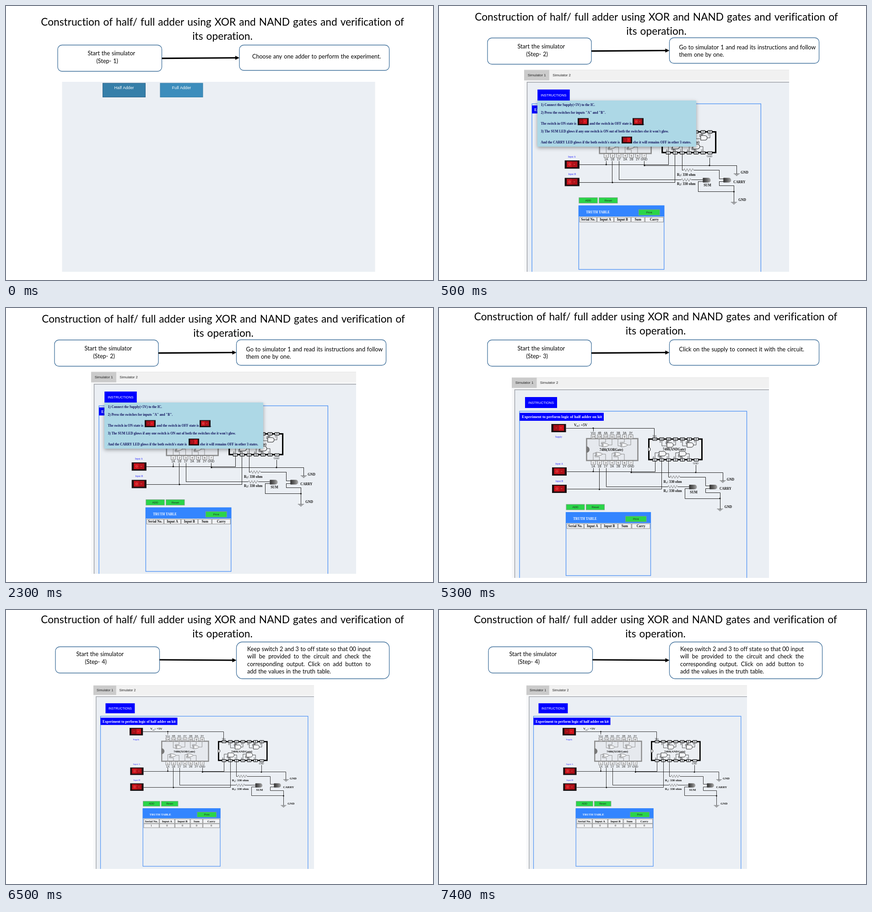
An HTML page with a canvas that plays this animation: 933 px wide and 600 px high, repeating every 8 s.

```html
<!DOCTYPE html>
<html lang="en">
<head>
<meta charset="utf-8">
<title>Half adder steps</title>
<style>
  html, body { margin: 0; width: 100%; height: 100%; overflow: hidden; background: #fff; }
  canvas { display: block; }
</style>
</head>
<body>
<canvas id="stage" width="933" height="600"></canvas>
<script>
const ctx = document.getElementById('stage').getContext('2d');
const SANS = '"Liberation Sans", sans-serif';
const SERIF = '"Liberation Serif", serif';
const LATO = 'Lato, sans-serif';
const PANEL = '#ebeff4';
const LOOP = 8000;
const TITLE_SIZE = 22.7;
const BODY_SIZE = 12.6;
const WORD_GAP = 0.054;

const TITLE = [
  'Construction of half/ full adder using XOR and NAND gates and verification of',
  'its operation.'
];

// left/right: [x, y, width, height] of the two boxes; sim: [x, y, scale, right, bottom]
const scenes = [
  { until: 500, title: [473, 43], left: [113, 85.5, 227.5, 57.5], right: [510, 85.5, 327.5, 55.5],
    step: [178.5, 108], note: [538, 115], arrow: [114.7, 113.5],
    lines: ['Choose any one adder to perform the experiment.'] },
  { until: 3500, title: [475, 32], left: [106, 70, 227, 57.5], right: [503.5, 69.5, 327, 56],
    step: [171.5, 92.5], note: [524.5, 94.5], arrow: [98.7, 97.5],
    lines: ['Go to simulator 1 and read its instructions and follow', 'them one by one.'],
    sim: [186, 139.6, 1.0075, 765, 582], help: true },
  { until: 6500, title: [473.5, 27], left: [106, 70, 227, 57.5], right: [503.5, 69.5, 327, 56],
    step: [171.5, 92.5], note: [524.5, 94.5], arrow: [98.7, 97.5],
    lines: ['Click on the supply to connect it with the circuit.'],
    sim: [159, 152, 1, 721, 591] },
  { until: LOOP, title: [473, 29], left: [108, 80.5, 227.5, 57.5], right: [503.5, 70, 334, 80.5],
    step: [153.5, 101], note: [527, 89.5], arrow: [109, 110], justify: 270,
    lines: ['Keep switch 2 and 3 to off state so that 00 input',
            'will be provided to the circuit and check the',
            'corresponding output. Click on add button to',
            'add the values in the truth table.'],
    sim: [191, 165, 0.913, 673, 567], row: true }
];

function text(str, x, y, size, { font = SERIF, weight = 'bold', color = '#111', align = 'left', gap = 0 } = {}) {
  ctx.font = `${weight} ${size}px ${font}`;
  ctx.fillStyle = color;
  ctx.textAlign = align;
  ctx.wordSpacing = gap + 'px';
  ctx.letterSpacing = '0.001px'; // any spacing turns ligatures off
  ctx.fillText(str, x, y);
  ctx.wordSpacing = '0px';
}

// Text centred on a point
const label = (str, x, y, size, opts = {}) =>
  text(str, x, y + size * 0.34, size, { align: 'center', ...opts });

const sans = (str, x, y, size, color = '#222') =>
  label(str, x, y, size, { font: SANS, weight: 'normal', color });

const lato = (str, x, y, size, opts = {}) =>
  text(str, x, y, size, { font: LATO, weight: 'normal', color: '#000', gap: size * WORD_GAP, ...opts });

function box(x, y, w, h, fill, stroke, width = 1) {
  if (fill) { ctx.fillStyle = fill; ctx.fillRect(x, y, w, h); }
  if (stroke) { ctx.strokeStyle = stroke; ctx.lineWidth = width; ctx.strokeRect(x, y, w, h); }
}

function line(points, color = '#222', width = 1) {
  ctx.beginPath();
  for (let i = 0; i < points.length; i += 2) ctx.lineTo(points[i], points[i + 1]);
  ctx.strokeStyle = color;
  ctx.lineWidth = width;
  ctx.stroke();
}

// A line whose corners sit on pixel centres of the stage
function wire(points, color, width) {
  const { a, e, f } = ctx.getTransform();
  const snap = (v, shift) => (Math.floor(v * a + shift) + 0.5 - shift) / a;
  line(points.map((v, i) => snap(v, i % 2 ? f : e)), color, width);
}

function dot(x, y, r = 1.6, fill = '#111') {
  ctx.beginPath();
  ctx.arc(x, y, r, 0, 7);
  ctx.fillStyle = fill;
  ctx.fill();
}

function rounded([x, y, w, h], radius) {
  ctx.beginPath();
  ctx.roundRect(x, y, w, h, radius);
  ctx.strokeStyle = '#41719c';
  ctx.lineWidth = 1.3;
  ctx.stroke();
}

function drawSlide(scene, number) {
  const [tx, ty] = scene.title;
  TITLE.forEach((str, i) => lato(str, tx, ty + i * 31, TITLE_SIZE, { align: 'center' }));

  rounded(scene.left, 9.5);
  rounded(scene.right, scene.right[3] > 60 ? 13 : 9.5);
  const start = scene.left[0] + scene.left[2], tip = scene.right[0];
  const [y0, y1] = scene.arrow;
  line([start, y0, tip - 7, y1], '#000', 3.2);
  ctx.beginPath();
  ctx.moveTo(tip, y1);
  ctx.lineTo(tip - 9, y1 - 4.6);
  ctx.lineTo(tip - 9, y1 + 4.6);
  ctx.fillStyle = '#000';
  ctx.fill();

  const [sx, sy] = scene.step;
  lato('Start the simulator', sx, sy, BODY_SIZE);
  lato(`(Step- ${number})`, sx + 19, sy + 17, BODY_SIZE);

  const [nx, ny] = scene.note;
  scene.lines.forEach((str, i) => {
    let gap = BODY_SIZE * WORD_GAP;
    if (scene.justify && i < scene.lines.length - 1) {
      ctx.font = `${BODY_SIZE}px ${LATO}`;
      gap = (scene.justify - ctx.measureText(str).width) / (str.split(' ').length - 1);
    }
    lato(str, nx, ny + i * 16.6, BODY_SIZE, { gap });
  });
}

function drawMenu() {
  box(122.5, 166, 684, 416, PANEL);
  box(211.5, 169, 93, 30.5, '#367fa9', '#2a6188');
  box(337, 169, 93, 30.5, '#3c8dbc', '#367fa9');
  sans('Half Adder', 258, 179, 9.1, '#fff');
  sans('Full Adder', 383.5, 179, 9.1, '#fff');
}

function rocker(x, y, w = 32, h = 18, off = true) {
  box(x, y, w, h, '#1c1012');
  const ix = x + w * 0.14, iy = y + h * 0.12, iw = w * 0.72, ih = h * 0.7;
  box(ix, iy, iw / 2, ih, off ? '#cc141c' : '#a40e16');
  box(ix + iw / 2, iy, iw / 2, ih, off ? '#b01018' : '#d4141c');
  const my = y + h * 0.48;
  if (off) {
    ctx.beginPath();
    ctx.arc(ix + iw * 0.27, my, h * 0.11, 0, 7);
    ctx.strokeStyle = '#e07870';
    ctx.lineWidth = 0.8;
    ctx.stroke();
  } else {
    line([ix + iw * 0.2, my, ix + iw * 0.34, my], '#c85850', 0.8);
  }
  line([ix + iw * 0.64, my, ix + iw * 0.78, my], '#e07870', 0.8);
}

function gate(x, y, w, h, xor, color) {
  ctx.beginPath();
  if (xor) {
    ctx.moveTo(x, y - h / 2);
    ctx.quadraticCurveTo(x + w * 0.75, y - h / 2, x + w, y);
    ctx.quadraticCurveTo(x + w * 0.75, y + h / 2, x, y + h / 2);
    ctx.quadraticCurveTo(x + w * 0.28, y, x, y - h / 2);
  } else {
    ctx.moveTo(x, y - h / 2);
    ctx.lineTo(x + w - h / 2, y - h / 2);
    ctx.arc(x + w - h / 2, y, h / 2, -Math.PI / 2, Math.PI / 2);
    ctx.lineTo(x, y + h / 2);
    ctx.closePath();
  }
  ctx.fillStyle = '#f4f5f7';
  ctx.fill();
  ctx.strokeStyle = color;
  ctx.lineWidth = 1;
  ctx.stroke();
  if (xor) {
    ctx.beginPath();
    ctx.moveTo(x - 2, y - h / 2);
    ctx.quadraticCurveTo(x + w * 0.28 - 2, y, x - 2, y + h / 2);
    ctx.stroke();
  }
}

// A gate with two inputs and an output led to three neighbouring pins
function gateToPins(x, y, w, h, pins, edge, xor, color) {
  const [a, b, out] = pins, s = Math.sign(edge - y);
  line([a, edge, a, y - s * 2, x, y - s * 2], color, 0.8);
  line([b, edge, b, y + s * (h / 2 + 2), x - 2, y + s * (h / 2 + 2), x - 2, y + s * 2, x, y + s * 2], color, 0.8);
  line([x + w, y, out, y, out, edge], color, 0.8);
  gate(x, y, w, h, xor, color);
}

function drawXorChip() {
  const pin = i => 337 + i * 13.7;
  box(322.5, 286, 112, 48, '#e6e9ee', '#8a8a8a', 2.6);
  ctx.beginPath();
  ctx.arc(322, 310, 7, -Math.PI / 2, Math.PI / 2);
  ctx.fillStyle = '#777';
  ctx.fill();
  const top = ['Vcc', '4B', '4A', '4Y', '3B', '3A', '3Y'];
  const bottom = ['1A', '1B', '1Y', '2A', '2B', '2Y', 'GND'];
  top.forEach((name, i) => {
    box(pin(i) - 4.6, 277.5, 9.2, 8.5, '#f2f3f5', '#777', 1);
    sans(14 - i, pin(i), 282, 6.2);
    sans(name, pin(i), 273.5, 6.6);
    box(pin(i) - 4.6, 334.5, 9.2, 8.5, '#f2f3f5', '#777', 1);
    sans(i + 1, pin(i), 339, 6.2);
    sans(bottom[i], pin(i), 347, 6.6);
  });
  const grey = '#777';
  gateToPins(357, 300, 14, 8, [350, 364, 378], 287, true, grey);
  gateToPins(398, 300, 14, 8, [391, 405, 419], 287, true, grey);
  gateToPins(343, 320, 14, 8, [337, 350.5, 364], 333, true, grey);
  gateToPins(384, 320, 14, 8, [378, 391.5, 405], 333, true, grey);
  label('7486(XORGate)', 376.5, 310, 7.4);
}

function drawAndChip() {
  const pin = i => 471.5 + i * 15.1;
  box(458.5, 287, 116, 45, '#eceff3', '#000', 3);
  ctx.beginPath();
  ctx.arc(458, 309.5, 4, -Math.PI / 2, Math.PI / 2);
  ctx.fillStyle = '#fff';
  ctx.fill();
  ctx.strokeStyle = '#000';
  ctx.lineWidth = 1;
  ctx.stroke();
  for (let i = 0; i < 7; i++) {
    box(pin(i) - 4.5, 284, 9, 6, '#dde0e4', '#000', 1);
    sans(14 - i, pin(i), 287, 5.4);
    box(pin(i) - 4.5, 330, 9, 5.5, '#dde0e4', '#000', 1);
    sans(i + 1, pin(i), 333, 5.4);
    if (i) sans('ABY'[(i - 1) % 3], pin(i) - 3, 293.5, 5.2);
    if (i < 6) sans('ABY'[i % 3], pin(i) - 3, 327.5, 5.2);
  }
  gateToPins(498, 300, 14, 10, [487, 502, 517], 290, false, '#222');
  gateToPins(542, 300, 14, 10, [532, 547, 562], 290, false, '#222');
  gateToPins(481, 319, 15, 10, [472, 487, 502], 330, false, '#222');
  gateToPins(525, 319, 15, 10, [517, 532, 547], 330, false, '#222');
  label('7408(ANDGate)', 514, 310, 7.3);
  sans('Vcc', 471, 280.5, 5.2);
  sans('GND', 561, 340, 5.4);
}

function resistor(x, y) {
  const points = [x, y];
  for (let i = 0; i < 7; i++) points.push(x + 1.5 + i * 3, y + (i % 2 ? 3 : -3));
  points.push(x + 21.5, y);
  line(points, '#777', 0.9);
}

function ground(x, y) {
  [6.5, 4, 1.5].forEach((r, i) => line([x - r, y + i * 2, x + r, y + i * 2], '#444', 0.9));
}

function led(x, y) {
  const shade = ctx.createLinearGradient(x, 0, x + 17, 0);
  shade.addColorStop(0, '#333');
  shade.addColorStop(0.5, '#666');
  shade.addColorStop(1, '#aaa');
  ctx.beginPath();
  ctx.roundRect(x, y - 5, 17, 10, [1, 5, 5, 1]);
  ctx.fillStyle = shade;
  ctx.fill();
}

function drawCircuit() {
  wire([277, 263, 470.5, 263, 470.5, 284]);
  wire([337, 263, 337, 270]);
  wire([279, 358, 472, 358, 472, 335]);
  wire([337, 350, 337, 358]);
  wire([420, 350, 420, 360, 620, 360, 620, 378]);
  wire([561, 343, 561, 360]);
  wire([279, 396.7, 486.5, 396.7, 486.5, 335]);
  wire([350.5, 350, 350.5, 397]);
  wire([365, 350, 365, 391.5, 500, 391.5]);
  wire([521.5, 391.5, 547, 391.5]);
  wire([501.5, 335, 501.5, 370, 505, 370]);
  wire([526.5, 370, 582, 370, 582, 389.5, 594, 389.5]);
  wire([594, 395.5, 582, 395.5, 582, 404, 614, 404, 614, 440]);
  wire([549, 395.5, 537, 395.5, 537, 417, 614, 417]);
  [[337, 263], [337, 358], [420, 360], [561, 360], [350.5, 397], [614, 417]].forEach(([x, y]) => dot(x, y));
  resistor(505, 370);
  resistor(500, 391.5);
  ground(620, 378);
  ground(614, 440);
  led(546.5, 392);
  led(591, 392);

  drawXorChip();
  drawAndChip();

  rocker(245.5, 254, 32, 18, false);
  rocker(247, 349);
  rocker(247, 387);
  const blue = { color: '#2222ff', weight: 'normal' };
  label('Supply', 261.5, 282, 5.4, blue);
  label('Input A', 262.5, 341, 5.4, blue);
  label('Input B', 263, 379, 5.4, blue);

  text('V', 295, 258.5, 7.8);
  text('cc', 300.6, 260, 5.2);
  text(': +5V', 305.5, 258.5, 7.8);
  [['1', 382.5], ['2', 402.5]].forEach(([n, y]) => {
    text('R', 490.5, y, 7.6);
    text(n, 496, y + 1.5, 5);
    text(': 330 ohm', 498.4, y, 7.6);
  });
  label('GND', 637, 375.5, 7.4);
  label('GND', 632, 435, 7.4);
  label('CARRY', 626, 396, 7.3);
  label('SUM', 556.5, 403, 7.4);
}

function greenButton(name, x, y, w, h) {
  box(x, y, w, h, '#2ad548', '#7fa088', 1);
  sans(name, x + w / 2, y + h / 2, 6.2);
}

function drawTable(withRow) {
  greenButton('ADD', 278, 430, 40, 12);
  greenButton('Reset', 321.5, 430, 40, 12);
  box(277.5, 447.5, 185, 138.5, null, '#4a90f5', 1.3);
  box(277, 447, 186, 24, '#3385ff');
  label('TRUTH TABLE', 319, 461.5, 7.25, { color: '#fff' });
  greenButton('Print', 407.5, 456, 45.5, 12);
  const names = ['Serial No.', 'Input A', 'Input B', 'Sum', 'Carry'];
  const edges = [279, 317, 354, 391, 421, 462];
  names.forEach((name, i) => {
    const x = edges[i] + 0.5, w = edges[i + 1] - edges[i] - 1.5, mid = x + w / 2;
    box(x, 472.5, w, 10.5, '#f1f2f4', '#8a8a8a');
    label(name, mid, 477.8, 7.3);
    if (withRow) {
      box(x, 484, w, 9.5, '#f1f2f4', '#8a8a8a');
      label(i ? '0' : '1', mid, 488.6, 7, { weight: 'normal' });
    }
  });
}

function drawSimulator({ sim: [x, y, scale, right, bottom], row }) {
  ctx.save();
  ctx.beginPath();
  ctx.rect(x, y, right - x, bottom - y);
  ctx.clip();
  ctx.translate(x, y);
  ctx.scale(scale, scale);
  ctx.translate(-159, -152);

  box(159, 152, 600, 450, '#f7f8f9');
  box(159, 152, 600, 23, '#f1f1f1');
  box(159, 152, 54.5, 23, '#cbcbcb');
  line([159, 152.4, 759, 152.4], '#ddd', 0.8);
  sans('Simulator 1', 186.5, 163.5, 7.8);
  sans('Simulator 2', 240.5, 163.5, 7.8);

  box(165.5, 179, 600, 430, PANEL, '#a2a5ab', 1.6);
  box(188, 195, 70, 24, '#0000ff');
  sans('INSTRUCTIONS', 223, 207, 7.45, '#fff');
  box(176, 226, 496.5, 400, null, '#4a90f5', 1.3);
  box(176, 229.5, 184, 17.5, '#0000ff');
  label('Experiment to perform logic of half adder on kit', 268.5, 238.5, 8.47, { color: '#fff' });
  drawCircuit();
  drawTable(row);
  ctx.restore();
}

function drawHelp() {
  ctx.save();
  ctx.shadowColor = 'rgba(0,0,0,.35)';
  ctx.shadowBlur = 8;
  ctx.shadowOffsetY = 3;
  box(215, 207, 347, 101, '#add8e6');
  ctx.restore();
  const say = (str, x, y) => text(str, x, y, 7.3, { color: '#10105c' });
  say('1) Connect the Supply(+5V) to the IC.', 222.5, 219);
  say('2) Press the switches for inputs "A" and "B".', 222.5, 236);
  say('The switch in ON state is', 222.5, 260);
  rocker(303, 245.5, 24, 15.5, false);
  say('and the switch in OFF state is', 329, 260);
  rocker(423, 245.5, 24, 15.5);
  say('.', 447, 260);
  say("3) The SUM LED glows if any one switch is ON out of both the switches else it won't glow.", 222.5, 276.5);
  say("And the CARRY LED glows if the both switch's state is", 222.5, 300.5);
  rocker(399, 286, 23, 15, false);
  say('else it will remains OFF in other 3 states.', 424, 300.5);
}

function render(now) {
  const t = now % LOOP;
  const index = scenes.findIndex(s => t < s.until);
  const scene = scenes[index];
  box(0, 0, 933, 600, '#fff');
  drawSlide(scene, index + 1);
  if (scene.sim) drawSimulator(scene);
  else drawMenu();
  if (scene.help) drawHelp();
}

const began = performance.now();
function tick() {
  render(performance.now() - began);
  requestAnimationFrame(tick);
}
tick();
</script>
</body>
</html>
```
